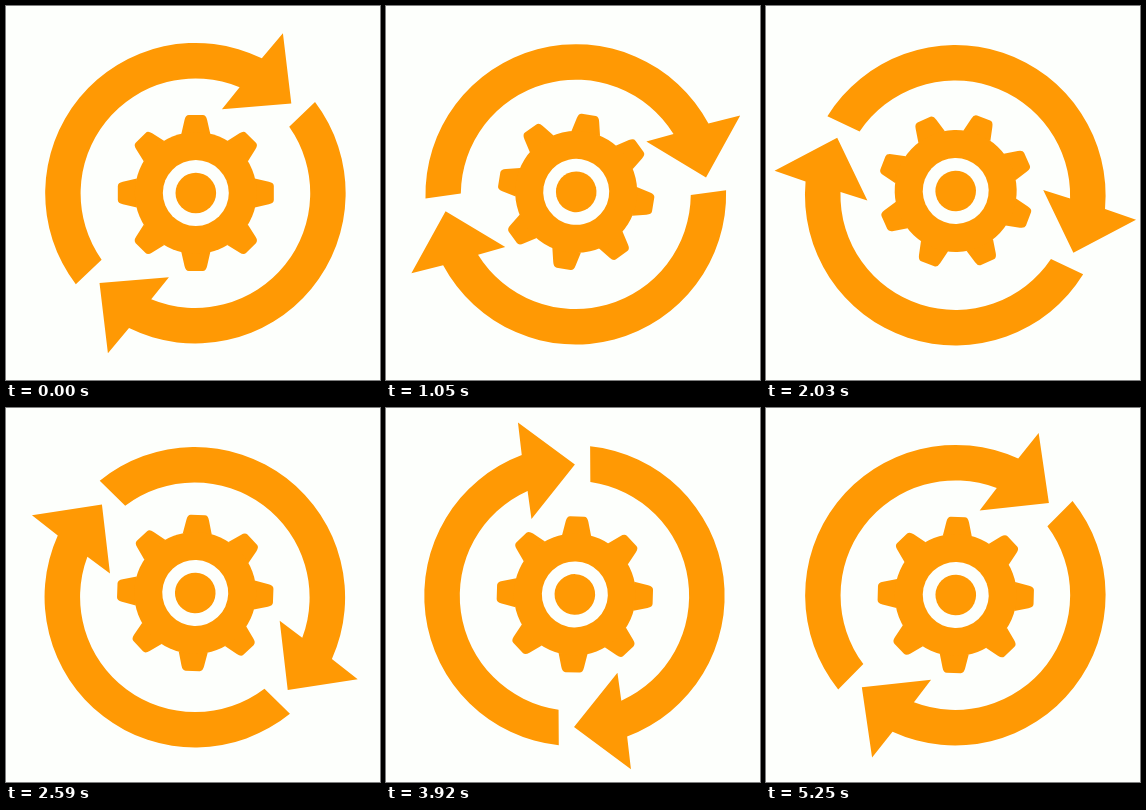
These frames come from a looping animation (374x374 px, 5320 ms). An HTML page:

```html
<!DOCTYPE html>
<html lang="en">
<head>
<meta charset="utf-8">
<title>Process gear</title>
<style>
  html, body { margin: 0; height: 100%; overflow: hidden; background: #fdfffc; }
  svg { display: block; width: 100%; height: 100%; fill: #ff9904; }
  .hole { fill: #fdfffc; }
</style>
</head>
<body>
<svg viewBox="0 0 374 374">
  <defs>
    <path id="arrow" d="M-119.6 91.1A150.4 150.4 0 0 1 66.4 -134.9L87.5 -160L95.9 -89.7L26.5 -84L44.2 -106A115 115 0 0 0 -93.8 66.5Z"/>
    <path id="tooth" d="M-14.5 -59L-11.3 -73Q-10.2 -78 -7 -78H7Q10.2 -78 11.3 -73L14.5 -59Z"/>
  </defs>
  <g id="arrows">
    <use href="#arrow"/>
    <use href="#arrow" transform="rotate(180)"/>
  </g>
  <g id="gear">
    <circle r="61"/>
    <circle r="33" class="hole"/>
    <circle r="20.3"/>
  </g>
</svg>
<script>
  const LOOP = 5320, STEP = 70, SPEED = 0.034; // ms, ms, degrees per ms
  const arrows = document.getElementById('arrows');
  const gear = document.getElementById('gear');

  for (let i = 0; i < 8; i++) {
    const tooth = document.createElementNS('http://www.w3.org/2000/svg', 'use');
    tooth.setAttribute('href', '#tooth');
    tooth.setAttribute('transform', `rotate(${i * 45})`);
    gear.prepend(tooth);
  }

  // Turn a part while its centre drifts on a tiny circle in the same direction
  function pose(part, cx, cy, dir, t) {
    const a = dir * (2 * Math.PI * t / LOOP - 1.1);
    const x = cx + 0.7 * Math.cos(a), y = cy + 1.1 * Math.sin(a);
    part.setAttribute('transform', `translate(${x} ${y}) rotate(${dir * SPEED * t})`);
  }

  const start = performance.now();
  function draw(now) {
    const t = Math.floor(Math.max(0, now - start) % LOOP / STEP) * STEP;
    pose(arrows, 189.1, 188.2, 1, t);
    pose(gear, 189.5, 186, -1, t);
    requestAnimationFrame(draw);
  }
  draw(start);
</script>
</body>
</html>
```
